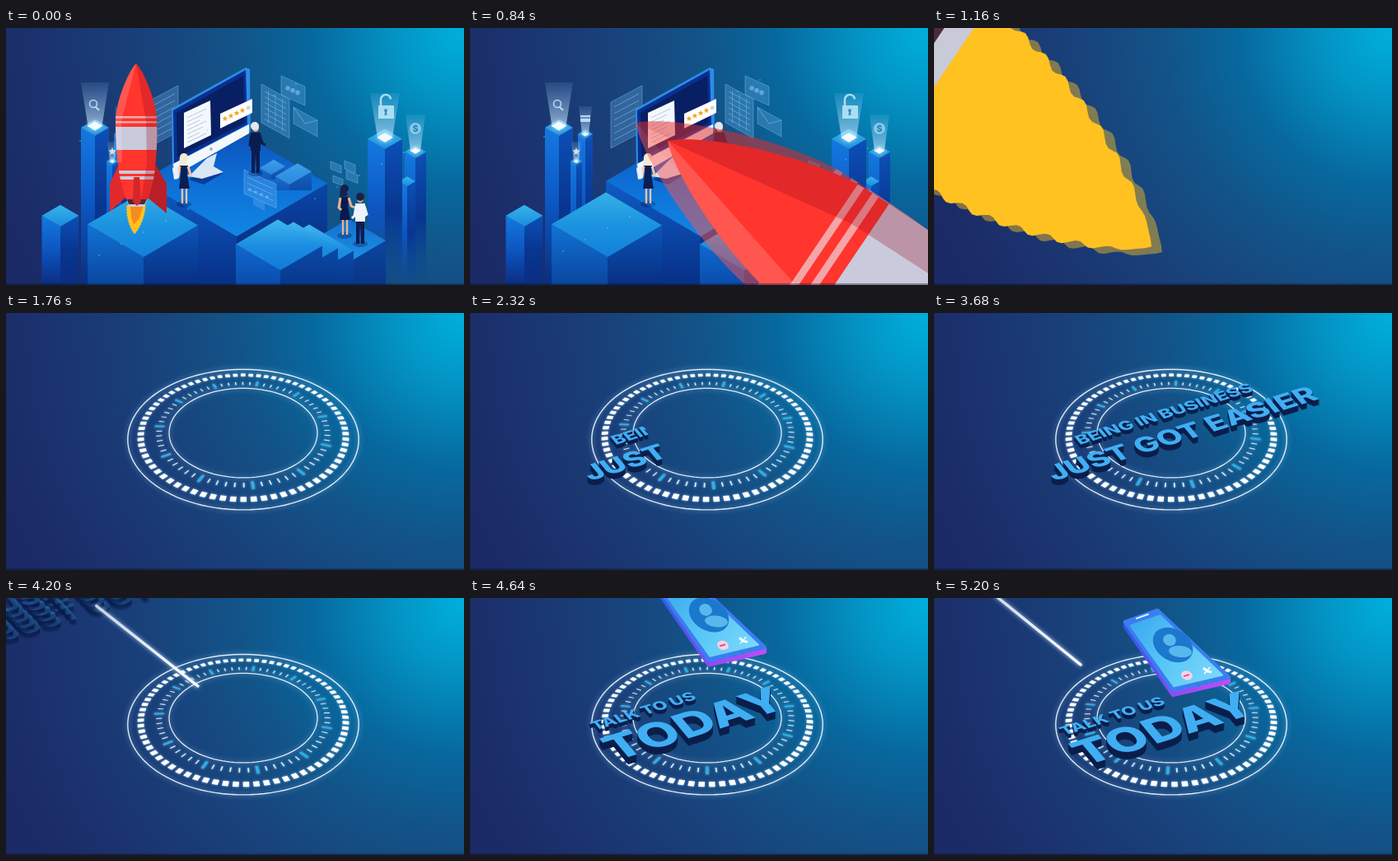
Write an HTML page with a canvas that moves like this. It is 556 px wide and 312 px high and loops after 5.24 s.

```html
<!DOCTYPE html>
<html lang="en">
<head>
<meta charset="utf-8">
<style>
html, body { margin: 0; width: 100%; height: 100%; overflow: hidden; background: #1b3070; }
canvas { display: block; width: 556px; height: 312px; }
</style>
</head>
<body>
<canvas id="stage" width="556" height="312"></canvas>
<script>
const c = document.getElementById('stage').getContext('2d');
const W = 556, H = 312, LOOP = 5240, TAU = Math.PI * 2;
const clamp = (v, a = 0, b = 1) => Math.min(b, Math.max(a, v));
const span = (t, a, b) => clamp((t - a) / (b - a));
const easeOut = p => 1 - (1 - p) ** 3;

function poly(fill, ...p) {
  c.beginPath();
  for (let i = 0; i < p.length; i += 2) c.lineTo(p[i], p[i + 1]);
  c.closePath();
  c.fillStyle = fill;
  c.fill();
}
function line(color, width, ...p) {
  c.beginPath();
  for (let i = 0; i < p.length; i += 2) c.lineTo(p[i], p[i + 1]);
  c.strokeStyle = color;
  c.lineWidth = width;
  c.stroke();
}
function oval(fill, x, y, rx, ry = rx, turn = 0) {
  c.beginPath();
  c.ellipse(x, y, rx, ry, turn, 0, TAU);
  c.fillStyle = fill;
  c.fill();
}
function ramp(x0, y0, x1, y1, ...cols) {
  const g = c.createLinearGradient(x0, y0, x1, y1);
  cols.forEach((k, i) => g.addColorStop(i / (cols.length - 1), k));
  return g;
}

function backdrop() {
  const g = c.createRadialGradient(552, 8, 0, 552, 8, 600);
  const stops = [0, '#00aedb', .13, '#0394c4', .3, '#07699f', .45, '#125488', .64, '#19417a', .88, '#1b306c', 1, '#1a2a66'];
  for (let i = 0; i < stops.length; i += 2) g.addColorStop(stops[i], stops[i + 1]);
  c.fillStyle = g;
  c.fillRect(0, 0, W, H);
}

// --- isometric scene ---
const SLOPE = .585;
function block(x, y, a, b, tops, left, right, low = H) {
  const ly = y - a * SLOPE, ry = y - b * SLOPE;
  poly(ramp(0, ly, 0, low, ...left), x - a, ly, x, y, x, low, x - a, low);
  poly(ramp(0, ry, 0, low, ...right), x, y, x + b, ry, x + b, low, x, low);
  poly(ramp(x, ry - a * SLOPE, x, y, ...tops), x - a, ly, x, y, x + b, ry, x + b - a, ly - b * SLOPE);
}
function pillar(x, y, a, fade) {
  block(x, y, a, a, ['#36b4ea', '#1c8be0'], ['#1479e0', '#0d55c0', fade], ['#0c4fb8', '#08368f', fade]);
}
function beam(x, y, w, h) {
  poly(ramp(0, y, 0, y - h, 'rgba(200,235,255,.65)', 'rgba(160,215,255,.1)'),
    x - w * .5, y, x + w * .5, y, x + w, y - h, x - w, y - h);
  c.shadowColor = '#bfeaff';
  c.shadowBlur = 6;
  poly('#f2fbff', x - w * .55, y, x, y - w * .32, x + w * .55, y, x, y + w * .32);
  c.shadowBlur = 0;
}
const GLASS = 'rgba(110,180,235,.3)', EDGE = 'rgba(150,215,250,.5)';
function pane(x, y, w, h, k, rows) {
  poly(GLASS, x, y, x + w, y + w * k, x + w, y + w * k + h, x, y + h);
  line(EDGE, .7, x, y, x + w, y + w * k, x + w, y + w * k + h, x, y + h, x, y);
  for (let i = 1; i <= rows; i++) {
    const q = y + h * i / (rows + 1);
    line(EDGE, .9, x + 4, q + 4 * k, x + w - 4, q + (w - 4) * k);
  }
}
function person(x, y, h, o) {
  const u = h / 62;
  c.save();
  c.translate(x, y);
  c.scale(u, u);
  oval('rgba(4,25,90,.35)', 0, 0, 9, 4);
  if (o.dress) {
    line(o.skin, 2.4, -2, -22, -2, -1);
    line(o.skin, 2.4, 3, -22, 3, -1);
    poly(o.suit, -5, -47, 5, -47, 4, -36, 7, -19, -6, -19, -4, -36);
  } else {
    poly(o.leg || o.suit, -5, -30, 5, -30, 5, 0, 1, 0, 0, -24, -1, 0, -5, 0);
    poly(o.suit, -6, -49, 6, -49, 6, -27, -6, -27);
  }
  line(o.dress ? o.skin : o.suit, 3, -5, -46, -7, -34, o.reach < 0 ? -10 : -4, -31);
  line(o.dress ? o.skin : o.suit, 3, 5, -46, 8, -36, o.reach > 0 ? 12 : 5, -34);
  if (o.prop) poly('#e9f0f8', -14, -44, -7, -46, -6, -32, -12, -30);
  oval(o.skin, 0, -55, 4, 5);
  oval(o.hair, o.side || 0, -57, 5, 5);
  if (o.dress) poly(o.hair, -5, -57, 4, -59, 3, -48, -6, -47);
  c.restore();
}
function star(x, y, r, fill) {
  const p = [];
  for (let i = 0; i < 10; i++) {
    const q = i % 2 ? r * .45 : r, a = i * Math.PI / 5 - Math.PI / 2;
    p.push(x + q * Math.cos(a), y + q * Math.sin(a));
  }
  poly(fill, ...p);
}

function monitor() {
  poly('#0a3c9a', 222, 184, 250, 167, 264, 176, 240, 190);
  poly('#d9e6f5', 222, 180, 244, 158, 256, 152, 252, 168, 264, 175, 238, 183);
  poly('#2b8cea', 201, 98, 291, 48, 296, 50, 297, 126, 206, 178, 202, 176);
  poly('#0a2f8c', 203, 100, 291, 51, 293, 117, 204, 164);
  poly('#081f63', 207, 103, 288, 58, 290, 115, 208, 157);
  poly('#f4f8fd', 203, 165, 295, 117, 295, 128, 205, 179);
  oval('#9db7d6', 249, 147, 2);
  poly('#f4f8fd', 216, 103, 248, 88, 249, 130, 216, 146);
  for (let i = 0; i < 7; i++) line('#b9c9de', 1, 220, 109 + i * 5, 243 - i % 3 * 4, 98 + i * 5 + i % 3 * 2);
  poly('#ffffff', 260, 104, 299, 86, 299, 103, 260, 122);
  for (let i = 0; i < 5; i++) star(266 + i * 7, 110 - i * 3.3, 3.6, i < 4 ? '#f6a623' : '#c6cfdb');
}

function icons() {
  c.globalAlpha = .85;
  c.beginPath();
  c.arc(106, 92, 4.5, 0, TAU);
  c.strokeStyle = '#cfeaff';
  c.lineWidth = 1.6;
  c.stroke();
  line('#cfeaff', 2, 109, 96, 113, 100);
  poly('#cfeaff', 134, 106, 146, 106, 146, 114, 134, 114);
  line('#2a6db8', 1.6, 134, 109, 146, 109);
  star(129, 150, 5, '#e8f6ff');
  poly('#bfe9fb', 452, 94, 471, 94, 471, 110, 452, 110);
  c.beginPath();
  c.moveTo(455, 94);
  c.lineTo(455, 87);
  c.arc(461, 87, 6, Math.PI, -.1);
  c.strokeStyle = '#bfe9fb';
  c.lineWidth = 2.6;
  c.stroke();
  oval('#2f86b8', 461, 100, 2);
  poly('#2f86b8', 460, 100, 462, 100, 462.5, 106, 459.5, 106);
  oval('#8fd3ee', 497, 122, 7);
  c.fillStyle = '#1d6ea6';
  c.font = '700 11px Inter, sans-serif';
  c.textAlign = 'center';
  c.fillText('$', 497, 126);
  c.textAlign = 'left';
  c.globalAlpha = 1;
}

function scene(t) {
  const deep = 'rgba(10,45,130,.95)', thin = 'rgba(12,70,150,.08)';
  pillar(140, 134, 9, deep);
  pillar(108, 131, 17, deep);
  pillar(129, 166, 7, deep);
  pillar(66, 241, 22.5, deep);
  pillar(497, 158, 13, thin);
  pillar(487, 192, 10, thin);
  pillar(460, 147, 21, thin);
  beam(108, 119, 17, 53);
  beam(140, 129, 8, 34);
  beam(129, 162, 6, 24);
  beam(460, 133, 18, 54);
  beam(497, 149, 12, 44);
  icons();
  pane(171, 90, 38, 56, -.53, 6);
  block(280, 253, 115, 110, ['#0c4fb6', '#0d6fd6', '#1286e4'], ['#0e5cc6', '#072f86'], ['#0a46a8', '#05256f']);
  monitor();
  pane(310, 68, 34, 47, .55, 6);
  for (let i = 1; i < 4; i++) line(EDGE, .7, 310 + i * 8.5, 71 + i * 4.7, 310 + i * 8.5, 111 + i * 4.7);
  pane(334, 58, 29, 23, .45, 0);
  c.fillStyle = EDGE;
  for (let i = 0; i < 3; i++) oval(EDGE, 342 + i * 6, 73 + i * 2.7, 2.8);
  pane(349, 96, 29, 20, .55, 0);
  line(EDGE, .9, 349, 96, 363, 116, 378, 112);
  block(322, 178, 14, 17, ['#3d9fe8', '#2b87dd'], ['#1a6fd0', '#0f58b8'], ['#1563c4', '#0d4da8'], 184);
  block(344, 190, 17, 27, ['#3d9fe8', '#2b87dd'], ['#1a6fd0', '#0f58b8'], ['#1563c4', '#0d4da8'], 197);
  block(415, 285, 45, 46, ['#1270cc', '#1e92e6'], ['#0c53ba', '#08378f'], ['#0a469f', '#0a3585']);
  for (let i = 2; i >= 0; i--)
    block(333 + 19 * i, 294 + 3 * i, 54, 51, ['#3fb6ee', '#1c8fe2', '#1279d6'], ['#1069d0', '#0a4cab'], ['#0b4aa8', '#08378c']);
  pane(289, 172, 39, 29, .45, 3);
  poly(GLASS, 300, 206, 314, 212, 314, 222, 300, 215);
  for (let i = 0; i < 4; i++) star(296 + i * 7, 196 + i * 3, 2.6, EDGE);
  pane(394, 162, 13, 9, .4, 0);
  pane(411, 161, 13, 10, .4, 0);
  pane(397, 179, 12, 8, .4, 0);
  pane(413, 173, 14, 10, .4, 0);
  person(216, 214, 62, { dress: 1, suit: '#0a1f55', skin: '#f2c3a4', hair: '#f3ead2', prop: 1, reach: -1 });
  person(303, 176, 62, { suit: '#0b1c4e', skin: '#eab995', hair: '#e6e6ea', reach: 1, side: -1 });
  person(411, 252, 62, { dress: 1, suit: '#0a1a4a', skin: '#e9b28f', hair: '#18204a', reach: 1 });
  person(430, 262, 62, { suit: '#eef4fb', leg: '#0c1d52', skin: '#e9b28f', hair: '#1a2148', reach: -1 });
  block(167, 278, 68, 66, ['#35b0e6', '#1b93e0', '#1380da'], ['#1173d4', '#0a469f'], ['#0c55b8', '#072f83']);
  for (let i = 0; i < 16; i++) {
    const x = 90 + i * 131 % 420, y = 60 + (i * 83 + 312 - t * .006) % 235;
    oval('rgba(150,215,255,.45)', x, y, .9);
  }
}

// --- rocket, nose at the origin, one unit per pixel at rest ---
const NOZZLE = 174, TAIL = 207;
function hull() {
  c.beginPath();
  c.moveTo(0, 0);
  c.bezierCurveTo(10, 10, 25, 48, 25, 70);
  c.bezierCurveTo(26, 105, 24, 140, 14, 165);
  c.lineTo(-12, 165);
  c.bezierCurveTo(-22, 140, -25, 105, -25, 70);
  c.bezierCurveTo(-25, 48, -10, 10, 0, 0);
}
function flame(t) {
  const p = [], n = 60, len = TAIL - NOZZLE + 2;
  for (let i = -n; i <= n; i++) {
    const s = 1 - Math.abs(i) / n;
    const w = 11.5 * Math.sin(Math.PI / 2 * (1 - s) ** .8);
    const wave = .4 * Math.sin((1 - s) * 62 + t * .03) * Math.min(1, s * 8) * Math.min(1, (1 - s) * 5);
    p.push(Math.sign(i) * (w + wave) - s * 2, TAIL - (1 - s) * len);
  }
  poly('#ffc220', ...p);
}
function rocket(x, y, turn, size, t, alpha = 1) {
  c.save();
  c.globalAlpha = alpha;
  c.translate(x, y);
  c.rotate(turn);
  c.scale(size, size);
  flame(t);
  if (size < 2) poly('#f58a1f', -7, 174, 8, 174, 4, 188, -3, 196, -6, 186);
  poly('#c9cad8', -12, 163, 14, 163, 10, 174, -9, 174);
  poly('#4a2a3c', -12, 163, 14, 163, 10, 171, -9, 171);
  poly('#e02a2c', -20, 120, -32, 146, -32, 180, -12, 162);
  poly('#b81f28', 22, 120, 37, 146, 37, 182, 14, 163);
  hull();
  c.fillStyle = '#ff352e';
  c.fill();
  c.clip();
  c.fillStyle = '#f4a5a8';
  c.fillRect(-30, 64, 60, 2.6);
  c.fillRect(-30, 70, 60, 2.6);
  c.fillStyle = '#c9cbdc';
  c.fillRect(-30, 77, 60, 28);
  c.fillRect(-30, 130, 60, 4);
  c.fillRect(-30, 137, 60, 4);
  poly('rgba(150,10,30,.28)', 0, 0, 12, 70, 13, 120, 6, 166, 30, 166, 30, 0);
  poly('rgba(255,255,255,.16)', 0, 0, -18, 70, -17, 120, -30, 120, -30, 0);
  c.restore();
  if (size < 2) {
    c.save();
    c.globalAlpha = alpha;
    c.translate(x, y);
    poly('#d3272b', -3, 138, 4, 138, 6, 168, 1, 173, -4, 168);
    c.restore();
  }
}
function flyby(t, alpha) {
  const q = t - 840, d = 2.6 * q + (q > 0 ? .011 * q * q : 0);
  const drift = Math.max(0, q) / 320;
  rocket(240 - .83 * d - 41 * drift, 137 - .56 * d + 60 * drift, -.977, 3.45 * Math.exp(.0033 * q), t, alpha);
}
function rockets(t) {
  if (t < 640) {
    const q = Math.max(0, t - 40);
    rocket(158, 43 - .00115 * q * q, 0, 1, t);
  } else if (t < 1320) {
    flyby(t + (t < 1000 ? 16 : -5), .45);
    flyby(t, 1);
  }
}

// --- dial lying on the floor ---
function floorPoint(r, a) {
  const X = r * Math.cos(a), Y = r * Math.sin(a), w = 1 - Y * .00116;
  return [288 + X / w, 140 + Y * .6 / w];
}
function hoop(r, width) {
  const p = [];
  for (let i = 0; i <= 120; i++) p.push(...floorPoint(r, i / 120 * TAU));
  line('rgba(240,247,255,.92)', width, ...p);
}
function dash(fill, r0, r1, a, half) {
  poly(fill, ...floorPoint(r0, a - half / r0), ...floorPoint(r1, a - half / r1),
    ...floorPoint(r1, a + half / r1), ...floorPoint(r0, a + half / r0));
}
function dial(t) {
  const p = easeOut(span(t, 1240, 1640));
  if (!p) return;
  c.save();
  c.globalAlpha = p;
  const k = .3 + .7 * p, spin = (81.4 - .0548 * (t - 4200)) * Math.PI / 180;
  c.shadowColor = 'rgba(170,215,255,.8)';
  c.shadowBlur = 6;
  hoop(138.4 * k, 1.4);
  hoop(89.5 * k, 1.3);
  c.shadowBlur = 3;
  for (let i = 0; i < 72; i++) dash('#ffffff', 119.5 * k, 127 * k, i / 72 * TAU - spin, 3.2 * k);
  for (let i = 0; i < 66; i++) {
    const a = spin + i / 66 * TAU;
    if (i % 6) dash('#dcebfa', 98 * k, 105 * k, a, .8);
    else dash('#22b4ec', 96 * k, 108 * k, a, 1.5);
  }
  c.restore();
}

// --- raised lettering ---
function words(str, x, y, size, depth, edge = 999) {
  c.font = `800 ${size}px Inter, sans-serif`;
  for (let i = depth; i >= 0; i--) {
    c.save();
    c.translate(x, y + i);
    c.scale(1, .61);
    c.rotate(-.47);
    c.beginPath();
    c.rect(-30, -size * 1.1, edge + 30, size * 1.5);
    c.clip();
    c.fillStyle = i ? '#0b1f4c' : '#40aef3';
    c.fillText(str, 0, 0);
    c.restore();
  }
}
function smear(shift, step, draw) {
  const n = step > 2 ? 5 : 1;
  for (let i = 0; i < n; i++) {
    const m = shift + (n > 1 ? (i - 2) * step / 4 : 0);
    c.save();
    c.globalAlpha = n > 1 ? .24 : 1;
    c.translate(-160 * m / 100, -165 * m / 100);
    draw();
    c.restore();
  }
}
function firstLines(t) {
  if (t < 1960 || t > 4400) return;
  const q = Math.max(0, t - 4000) / 200;
  smear(100 * q * q, q * 16, () => {
    words('BEING IN BUSINESS', 177, 160, 24.8, 5, Math.max(-30, .3 * (t - 2165)));
    words('JUST GOT EASIER', 146, 204, 41, 7, .32 * (t - 1970));
  });
}
function lastLines(t) {
  if (t < 4400) return;
  const p = span(t, 4400, 4720), left = (1 - p) ** 3;
  smear(240 * left, left * 30, () => {
    words('TALK TO US', 158, 167, 23.6, 5);
    words('TODAY', 183, 204, 67, 9);
  });
}

// --- phone ---
function onPhone(u, v) {
  const lx = 229 + 60 * v, ly = 27 + 88 * v, rx = 270 + 93 * v, ry = 12 + 86 * v;
  return [lx + (rx - lx) * u, ly + (ry - ly) * u];
}
function slab(fill, u0, v0, u1, v1, round) {
  poly(fill, ...onPhone(u0, v0), ...onPhone(u1, v0), ...onPhone(u1, v1), ...onPhone(u0, v1));
  c.lineJoin = 'round';
  c.strokeStyle = fill;
  c.lineWidth = round;
  c.stroke();
}
function phone(t) {
  const p = easeOut(span(t, 4520, 4840));
  if (!p) return;
  c.save();
  c.translate(0, -150 * (1 - p));
  const rim = ramp(230, 30, 340, 120, '#2b5ce8', '#6a4cf0', '#c04cf5');
  for (let i = 6; i >= 0; i--) {
    c.save();
    c.translate(0, i);
    slab(i ? rim : '#3a7df0', .04, .03, .96, .97, 5);
    c.restore();
  }
  slab(ramp(240, 25, 340, 105, '#3aa9ee', '#58c6f6', '#7ad8fb'), .09, .09, .91, .93, 2);
  line('#d8f0ff', 2, ...onPhone(.33, .035), ...onPhone(.7, .035));
  oval('#1c78cc', 290, 57, 26, 19, .55);
  oval('#58b8ee', 286, 51, 8, 7, .5);
  oval('#58b8ee', 299, 65, 14, 7, .1);
  oval('#f7d3e6', 307, 94, 7, 5.5, .3);
  line('#e0427c', 1.6, 303, 95, 310, 93);
  line('#ffffff', 3, 327, 85, 332, 89, 337, 90);
  line('#ffffff', 1.5, 328, 92, 335, 84);
  for (let i = 0; i < 3; i++) oval('#2b86d2', 321 + i * 9, 106 - i * 2.8, 2.4, 2);
  c.restore();
}

function streak(t, at, x, y, dx, dy, reach) {
  const go = 1.3 * (t - at), head = Math.min(go, reach), tail = go - 157;
  if (tail >= head || go < -300) return;
  c.save();
  c.lineCap = 'round';
  c.shadowColor = '#cfe6ff';
  c.shadowBlur = 5;
  const x0 = x + dx * tail, y0 = y + dy * tail, x1 = x + dx * head, y1 = y + dy * head;
  line(ramp(x0, y0, x1, y1, 'rgba(235,244,255,.75)', '#ffffff'), 3.4, x0, y0, x1, y1);
  c.restore();
}

function draw(t) {
  backdrop();
  const show = 1 - span(t, 920, 1080);
  if (show) {
    c.save();
    if (show < 1) c.globalAlpha = show;
    if (show === 1) scene(t);
    else {
      scene(t);
      c.globalAlpha = 1 - show;
      backdrop();
    }
    c.restore();
  }
  rockets(t);
  dial(t);
  firstLines(t);
  lastLines(t);
  phone(t);
  streak(t, 4200, 233, 107, .785, .62, 85);
  streak(t, 5200, 178, 81, .777, .63, 140);
  c.fillStyle = 'rgba(12,22,60,.4)';
  c.fillRect(0, 310, W, 2);
}

const start = performance.now();
function tick() {
  const t = (performance.now() - start) % LOOP;
  draw(Math.floor(t / 40) * 40);
  requestAnimationFrame(tick);
}
tick();
</script>
</body>
</html>
```
